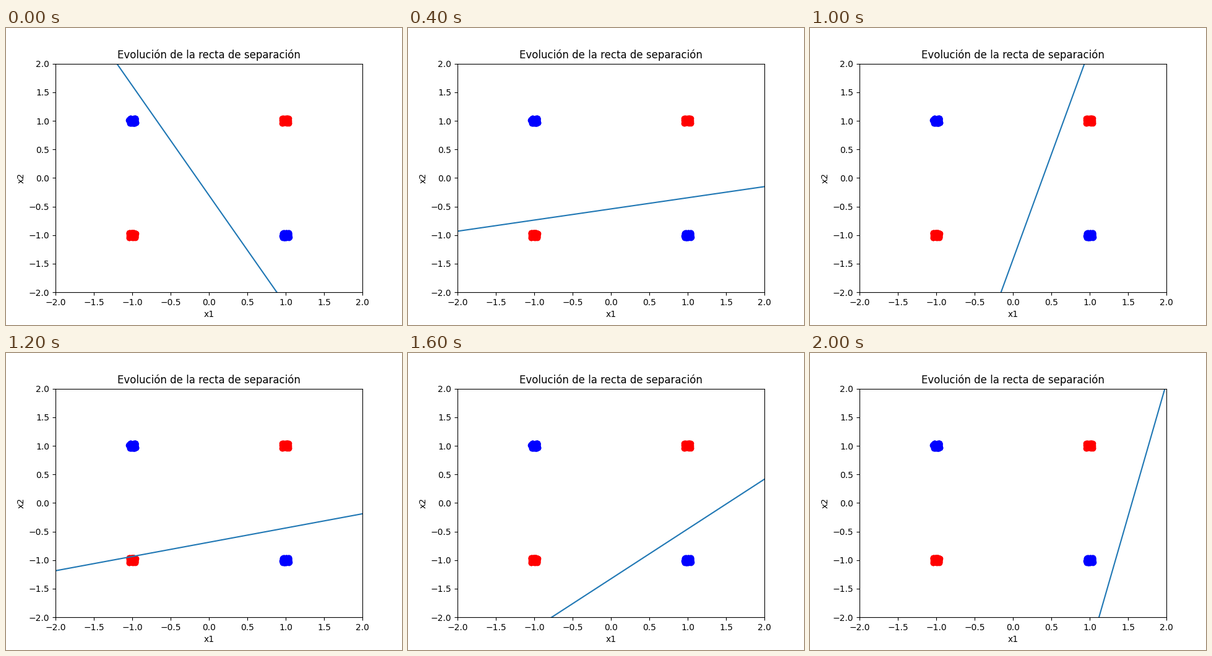
A matplotlib script for the animation above (2200 ms loop, 640x480 px).

```python
import numpy as np
import matplotlib.pyplot as plt
from matplotlib.animation import FuncAnimation

LIM = 2
SPREAD = 0.046
STEP_MS = 200

# Boundary x2 = slope * x1 + bias after each training step
SLOPES = [-1.918, 0.85, 0.195, -0.561, -0.65, 3.676, 0.249, -0.57, 0.871, 2.76, 4.657]
BIASES = [-0.302, -0.964, -0.541, 2.572, 4.5, -1.427, -0.687, 2.34, -1.326, -2.42, -7.22]

rng = np.random.default_rng(4)
fig, ax = plt.subplots(figsize=(6.4, 4.8), dpi=100)


def cluster(cx, cy, n=100):
    dx, dy = rng.uniform(-SPREAD, SPREAD, (2, n))
    ax.scatter(cx + dx, cy + dy, color="red" if cx == cy else "blue")


for cx in (-1, 1):
    for cy in (-1, 1):
        cluster(cx, cy)

ax.set(xlim=(-LIM, LIM), ylim=(-LIM, LIM), xlabel="x1", ylabel="x2",
       title="Evolución de la recta de separación")
xs = np.array([-LIM - 1, LIM + 1])
line, = ax.plot([], [])


def update(i):
    line.set_data(xs, SLOPES[i] * xs + BIASES[i])
    return line,


anim = FuncAnimation(fig, update, frames=len(SLOPES), interval=STEP_MS,
                     repeat=True, repeat_delay=0)
plt.show()
```
